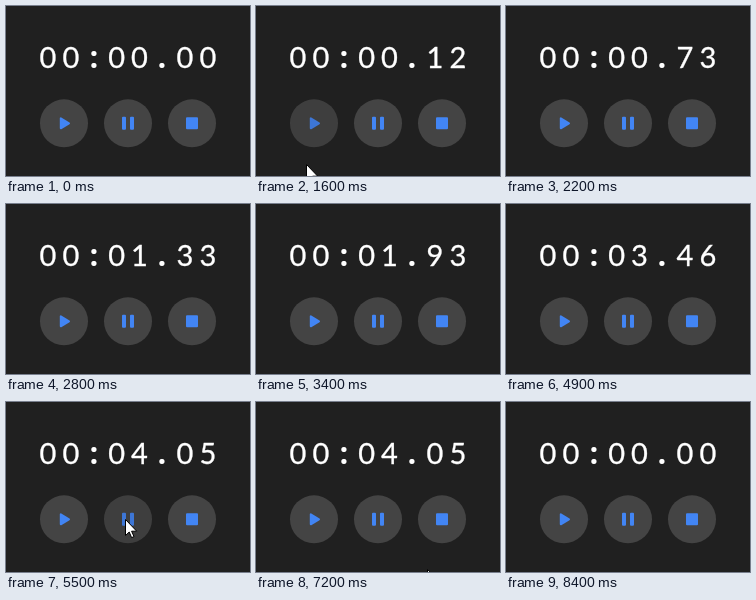
An HTML page that plays this animation: 244 by 170 pixels, repeating every 9400 ms.

```html
<!DOCTYPE html>
<html lang="en">
<head>
<meta charset="utf-8">
<title>Stopwatch</title>
<style>
  html, body { margin: 0; width: 100%; height: 100%; overflow: hidden; background: #202020; }
  svg { display: block; width: 244px; height: 170px; }
  #clock {
    font: 400 29px Lato, "DejaVu Sans", sans-serif;
    fill: #fff; stroke: #fff; stroke-width: .35px; text-anchor: middle;
  }
  .dot { font: 700 31px "Open Sans", sans-serif; stroke: none; }
  .button circle { fill: #444; }
  .button path { fill: #4285f4; stroke: #4285f4; stroke-width: 2; stroke-linejoin: round; }
  .hover { opacity: .86; }
</style>
</head>
<body>
<svg viewBox="0 0 244 170">
  <text id="clock" y="61.5" x="42 64.9 87.8 110.6 133.4 156 179 202"><tspan>00</tspan><tspan class="dot">:</tspan><tspan>00</tspan><tspan class="dot">.</tspan><tspan>00</tspan></text>
  <g class="button" id="play" transform="translate(58 117.3)">
    <circle r="24"/><path d="M-3.2-5V5L5 0Z"/>
  </g>
  <g class="button" id="pause" transform="translate(122 117.3)">
    <circle r="24"/><path d="M-5-5.5h2v11h-2zM3-5.5h2v11h-2z"/>
  </g>
  <g class="button" id="stop" transform="translate(186 117.3)">
    <circle r="24"/><path d="M-5-5H5V5H-5Z"/>
  </g>
  <path id="cursor" d="M.5.5V16.5L4.2 13 6.6 18.6 9 17.6 6.6 12.2H11.7Z" fill="#fff" stroke="#000" visibility="hidden"/>
</svg>
<script>
  const LOOP = 9400, STEP = 100;
  const $ = id => document.getElementById(id);
  const [minutes, , seconds, , hundredths] = $("clock").children;
  const start = performance.now();

  // [time, hundredths of a second]
  const count = [[1400, 0], [1500, 2], [1600, 12], [2800, 133], [4000, 253], [4900, 346], [5500, 405]];

  // Each visit: hovered button, hover span, time the pointer leaves, [time, x, y] points
  const visits = [
    { id: "play", hover: [1500, 1700], end: 1700, path: [[1500, 53, 140], [1600, 50, 158]] },
    { id: "pause", hover: [5300, 5900], end: 5900, path: [[5300, 120, 141], [5400, 119, 117]] },
    { id: "stop", hover: [7400, 8000], end: 8000, path: [[7200, 171, 167], [7400, 184, 134], [7500, 188, 123]] }
  ];

  // Linear interpolation between points, held at both ends
  function at(points, t, k = 1) {
    const i = points.findIndex(p => p[0] > t);
    if (i < 0) return points[points.length - 1][k];
    if (i === 0) return points[0][k];
    const a = points[i - 1], b = points[i];
    return a[k] + (b[k] - a[k]) * (t - a[0]) / (b[0] - a[0]);
  }

  const pad = n => String(n).padStart(2, "0");

  function draw() {
    const now = (performance.now() - start) % LOOP;
    const t = Math.floor(now / STEP) * STEP;

    const value = t < 7700 ? Math.round(at(count, t)) : 0;
    minutes.textContent = pad(Math.floor(value / 6000));
    seconds.textContent = pad(Math.floor(value / 100) % 60);
    hundredths.textContent = pad(value % 100);

    for (const { id, hover } of visits)
      $(id).classList.toggle("hover", t >= hover[0] && t < hover[1]);

    const visit = visits.find(v => t >= v.path[0][0] && t < v.end);
    $("cursor").setAttribute("visibility", visit ? "visible" : "hidden");
    if (visit)
      $("cursor").setAttribute("transform", `translate(${at(visit.path, t, 1)} ${at(visit.path, t, 2)})`);

    requestAnimationFrame(draw);
  }
  draw();
</script>
</body>
</html>
```
